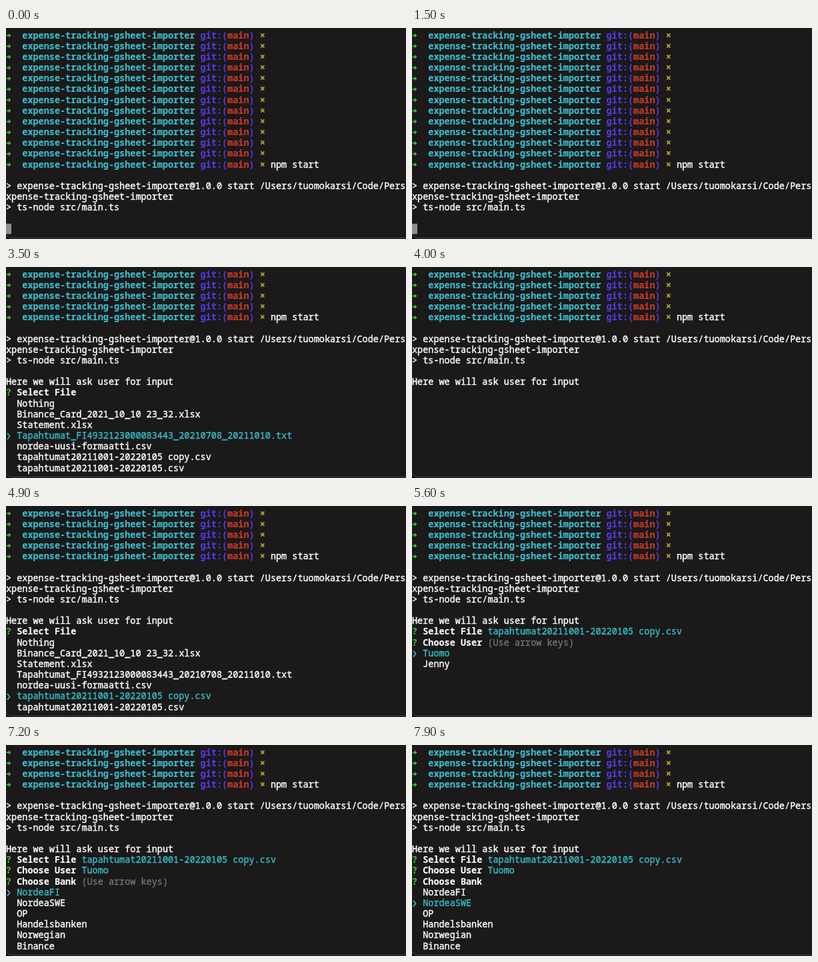
An HTML page with a canvas for the animation above (8 s loop, 600 by 317 pixels).

```html
<!DOCTYPE html>
<html lang="en">
<head>
<meta charset="utf-8">
<title>Terminal</title>
<style>
html, body { margin: 0; width: 100%; height: 100%; overflow: hidden; background: #1b191a; }
canvas { display: block; }
</style>
</head>
<body>
<canvas id="stage"></canvas>
<script>
const W = 600, H = 317, LOOP = 8000;
const CELL = 8.1, ROW = 16.17, BASE = 15.6;
const FONT = '13.5px "Noto Sans Mono", "DejaVu Sans Mono", monospace';
const C = {
  bg: '#1b191a', white: '#fbfbfb', cyan: '#35b8c4', name: '#38becc', blue: '#5438e8',
  red: '#cc3a25', yellow: '#b5b02c', green: '#3cc035', gray: '#706e6f', block: '#8f8d8e'
};
const PROJECT = 'expense-tracking-gsheet-importer';
const FILES = [
  'Nothing',
  'Binance_Card_2021_10_10 23_32.xlsx',
  'Statement.xlsx',
  'Tapahtumat_FI4932123000083443_20210708_20211010.txt',
  'nordea-uusi-formaatti.csv',
  'tapahtumat20211001-20220105 copy.csv',
  'tapahtumat20211001-20220105.csv'
];
const USERS = ['Tuomo', 'Jenny'];
const BANKS = ['NordeaFI', 'NordeaSWE', 'OP', 'Handelsbanken', 'Norwegian', 'Binance'];

// [start ms, screen, selected item, hint visible]
const STEPS = [
  [0, 'start'],
  [1700, 'file', 0, true],
  [2700, 'file', 1],
  [3100, 'file', 2],
  [3500, 'file', 3],
  [4000, 'cleared'],
  [4100, 'file', 4],
  [4500, 'file', 5],
  [5100, 'user', 0, true],
  [5700, 'user', 1],
  [6300, 'user', 0],
  [7100, 'bank', 0, true],
  [7600, 'bank', 1]
];

const canvas = document.getElementById('stage');
const ctx = canvas.getContext('2d');
const dpr = window.devicePixelRatio || 1;
canvas.width = W * dpr;
canvas.height = H * dpr;
canvas.style.width = W + 'px';
canvas.style.height = H + 'px';
ctx.lineJoin = 'round';

// A hairline outline gives the regular face a medium weight
function text(str, col, row, color = C.white, bold = false) {
  const x = col * CELL, y = BASE + row * ROW;
  ctx.font = (bold ? 'bold ' : '') + FONT;
  ctx.fillStyle = ctx.strokeStyle = color;
  ctx.fillText(str, x, y);
  ctx.lineWidth = bold ? 0.15 : 0.45;
  ctx.strokeText(str, x, y);
}

function arrow(row) {
  const y = BASE - 4.4 + row * ROW;
  ctx.fillStyle = C.green;
  ctx.fillRect(0.8, y - 0.9, 4, 1.8);
  ctx.beginPath();
  ctx.moveTo(3.8, y - 3.2);
  ctx.lineTo(7.6, y);
  ctx.lineTo(3.8, y + 3.2);
  ctx.fill();
}

function pointer(row) {
  const y = BASE - 3.8 + row * ROW;
  ctx.strokeStyle = C.cyan;
  ctx.lineWidth = 1.7;
  ctx.beginPath();
  ctx.moveTo(2, y - 4.6);
  ctx.lineTo(5.6, y);
  ctx.lineTo(2, y + 4.6);
  ctx.stroke();
}

function prompt(row) {
  arrow(row);
  text(PROJECT, 3, row, C.name, true);
  text('git:(', 36, row, C.blue, true);
  text('main', 41, row, C.red, true);
  text(')', 45, row, C.blue, true);
  text('×', 47, row, C.yellow, true);
}

// Prompts down to the row holding the command, then its output
function command(row) {
  for (let r = 0; r <= row; r++) prompt(r);
  text('npm start', 49, row);
  text('> ' + PROJECT + '@1.0.0 start /Users/tuomokarsi/Code/Pers', 0, row + 2);
  text(PROJECT.slice(1), 0, row + 3);
  text('> ts-node src/main.ts', 0, row + 4);
}

function question(label, row, answer, color = C.cyan) {
  text('?', 0, row, C.green, true);
  text(label, 2, row, C.white, true);
  if (answer) text(answer, 14, row, color);
}

function menu(label, items, row, selected, hint) {
  question(label, row, hint && '(Use arrow keys)', C.gray);
  items.forEach((item, i) => {
    const on = i === selected;
    if (on) pointer(row + 1 + i);
    text(item, 2, row + 1 + i, on ? C.cyan : C.white);
  });
}

function edgePath() {
  ctx.beginPath();
  ctx.moveTo(0, 310);
  ctx.quadraticCurveTo(2, 315.5, 9, 315.5);
  ctx.lineTo(W, 315.5);
}

function frameEdge() {
  edgePath();
  ctx.lineTo(W, H);
  ctx.lineTo(0, H);
  ctx.fillStyle = '#0c0b0c';
  ctx.fill();
  edgePath();
  ctx.strokeStyle = '#4c4a4b';
  ctx.lineWidth = 1;
  ctx.stroke();
}

function draw(t) {
  const [, screen, selected, hint] = STEPS.filter(s => s[0] <= t).pop();
  ctx.setTransform(dpr, 0, 0, dpr, 0, 0);
  ctx.fillStyle = C.bg;
  ctx.fillRect(0, 0, W, H);
  frameEdge();

  if (screen === 'start') {
    command(12);
    ctx.fillStyle = C.block;
    ctx.fillRect(0, 294, 8, 15.5);
    return;
  }
  const top = screen === 'bank' ? 3 : 4;
  command(top);
  text('Here we will ask user for input', 0, top + 6);
  if (screen === 'file') menu('Select File', FILES, top + 7, selected, hint);
  if (screen === 'user' || screen === 'bank') question('Select File', top + 7, FILES[5]);
  if (screen === 'user') menu('Choose User', USERS, top + 8, selected, hint);
  if (screen === 'bank') {
    question('Choose User', top + 8, USERS[0]);
    menu('Choose Bank', BANKS, top + 9, selected, hint);
  }
}

const began = performance.now();
function tick() {
  draw((performance.now() - began) % LOOP);
  requestAnimationFrame(tick);
}
tick();
</script>
</body>
</html>
```
